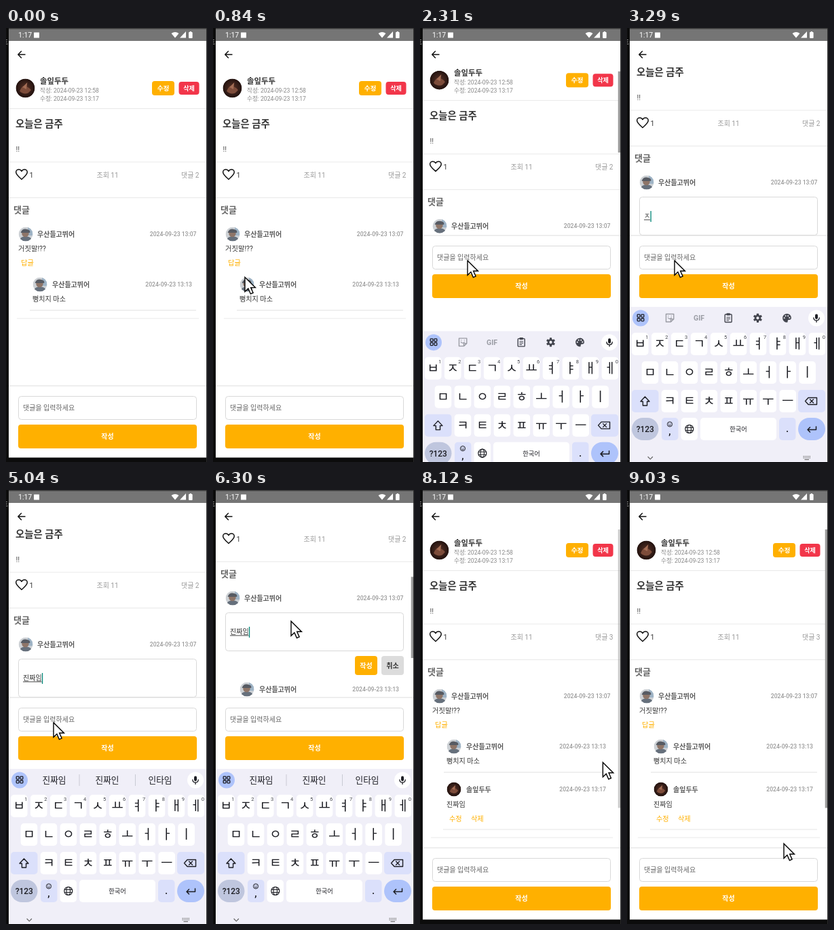
Write an HTML page that moves like this. It is 296x638 px and loops after 9100 ms.

```html
<!DOCTYPE html>
<html lang="ko">
<head>
<meta charset="utf-8">
<style>
html, body { margin: 0; width: 100%; height: 100%; overflow: hidden; background: #0c0c0c; }
svg { display: block; width: 296px; height: 638px; }
text { font-family: Roboto, 'Noto Sans CJK KR', 'Noto Sans CJK', sans-serif; white-space: pre; }
</style>
</head>
<body>
<svg id="stage" viewBox="0 0 296 638" xmlns="http://www.w3.org/2000/svg"></svg>
<script>
const LOOP = 9100, STEP = 70;
const VIEW_TOP = 58, FOOT_TOP = 526, FOOT_LIFT = 221, KB_TOP = 410;
const AMBER = '#ffb000', INK = '#333', GREY = '#999', CHAR = 9.2;
const AUTHOR = '솔잎두두', GUEST = '우산들고뛰어';

// markup helpers
const text = (x, y, s, size, fill, o = {}) =>
  `<text x="${x}" y="${y}" font-size="${size}" fill="${fill}" font-weight="${o.w || 400}" text-anchor="${o.a || 'start'}"${o.id ? ` id="${o.id}"` : ''}>${s}</text>`;
const rect = (x, y, w, h, fill, r = 0, extra = '') =>
  `<rect x="${x}" y="${y}" width="${w}" height="${h}" rx="${r}" fill="${fill}" ${extra}/>`;
const rule = (x1, x2, y, c = '#e9e9e9') => rect(x1, y - .5, x2 - x1, 1, c);
const path = (d, stroke = '#222', w = 1.4, fill = 'none') =>
  `<path d="${d}" stroke="${stroke}" stroke-width="${w}" fill="${fill}" stroke-linecap="round" stroke-linejoin="round"/>`;
const circle = (x, y, r, fill, extra = '') => `<circle cx="${x}" cy="${y}" r="${r}" fill="${fill}" ${extra}/>`;
const group = (id, inner, extra = '') => `<g id="${id}" ${extra}>${inner}</g>`;
const at = (x, y, inner, s = 1) => `<g transform="translate(${x} ${y}) scale(${s})">${inner}</g>`;
const button = (x, y, w, h, label, bg, fg, size = 10) =>
  rect(x, y, w, h, bg, 4) + text(x + w / 2, y + h / 2 + size * .37, label, size, fg, { w: 700, a: 'middle' });
const field = (y, h) => rect(18.5, y + .5, 262, h - 1, '#fff', 4, 'stroke="#d9d9d9"');

const darkPhoto = (x, y, r) => at(x, y, `<g clip-path="url(#disc)">${circle(0, 0, 10, 'url(#brown)')
  }<path d="M-6 3Q-3-4 1-2T6 2L3 5Q-2 7-6 3" fill="#7d4c3a"/><path d="M-3-1L2-6 1 1Z" fill="#a36d55"/></g>`, r / 10);
const lightPhoto = (x, y) => at(x, y, `<g clip-path="url(#disc)">${circle(0, 0, 10, '#cdd1d5')
  }${rect(3, -10, 7, 12, '#9fb4c6')}<path d="M-9 10Q-8 3 0 3T9 10Z" fill="#66707c"/>${
  circle(-.5, -1, 5, '#8e7568')}<path d="M-7-2Q-5-8 1-7T6-2Z" fill="#575b63"/></g>`, 1.05);

const comment = (x, y, photo, name, time, end) =>
  photo + text(x, y + 4, name, 10, '#5c5c5c', { w: 700 }) +
  text(end, y + 3, '2024-09-23 ' + time, 8.6, GREY, { w: 500, a: 'end' });

const post =
  darkPhoto(28.5, 88.5, 14) + text(50, 82, AUTHOR, 11.4, INK, { w: 700 }) +
  text(50, 94.8, '작성: 2024-09-23 12:58', 8.6, '#888') +
  text(50, 106.5, '수정: 2024-09-23 13:17', 8.6, '#888') +
  button(215, 78, 33, 21, '수정', AMBER, '#fff', 9.6) + button(254.5, 79, 30, 19, '삭제', '#f2364a', '#fff', 9) +
  rule(4, 295, 118.5) + text(14, 146, '오늘은 금주', 14.4, INK, { w: 700 }) +
  text(14.5, 182, '!!', 11, '#555') + rule(4, 295, 197) +
  path('M23 222.5C18 218 14.7 215.4 14.7 212 14.7 209.6 16.6 208 18.8 208 20.6 208 22.2 209 23 210.6 23.8 209 25.4 208 27.2 208 29.4 208 31.3 209.6 31.3 212 31.3 215.4 28 218 23 222.5Z', '#111', 1.5) +
  text(34.5, 220, '1', 10.5, INK) + text(149.5, 220, '조회 11', 10, GREY, { a: 'middle' }) +
  text(284.5, 220, '댓글 2', 10, GREY, { a: 'end', id: 'count' }) +
  rule(4, 295, 249.5) + text(11, 272, '댓글', 13, '#666', { w: 700 }) +
  comment(46, 303, lightPhoto(29, 303), GUEST, '13:07', 280.5);

const plain = text(18, 328, '거짓말!??', 10.3, INK) + text(22, 349, '답글', 10.3, AMBER, { id: 'reply' });

const form = field(324, 57) +
  text(25, 356, '대댓글을 입력하세요', 10, '#777', { id: 'hint' }) + text(25, 356, '', 10, INK, { id: 'typed' }) +
  rect(25, 357.5, 0, .9, INK, 0, 'id="under"') + rect(25, 345, 1.3, 16, '#008577', 0, 'id="caret"') +
  button(209, 388, 33, 28, '작성', AMBER, '#fff') + button(248, 388, 33, 28, '취소', '#dcdcdc', INK);

const nested = comment(68, 377, lightPhoto(50, 377), GUEST, '13:13', 274) +
  text(39, 402, '뻥치지 마소', 10.1, INK) + rule(35, 280, 415, '#e2e2e2');

const added = comment(68, 440, darkPhoto(50, 440, 10.5), AUTHOR, '13:17', 274) +
  text(39, 466, '진짜임', 10.1, INK) + text(43, 487, '수정', 10.2, AMBER) + text(75, 487, '삭제', 10.2, AMBER) +
  rule(34, 280, 499, '#e6e6e6');

const header = rect(4, 0, 291, VIEW_TOP, '#fff') + rect(4, 1, 291, 18, '#757575') + rect(4, 0, 291, 1.5, '#3c3c3c') +
  text(18, 14, '1:17', 10.5, '#fff') + rect(41, 6.5, 8, 8, '#fff', .5) +
  path('M243.5 8Q249 4 254.5 8L249 14.5Z', 'none', 0, '#fff') + path('M265 5V14.5H256Z', 'none', 0, '#fff') +
  rect(269, 6, 5.6, 9, '#fff', 1) + rect(270.7, 5, 2.2, 2, '#fff') +
  path('M28 39H18M22.5 34.3L17.8 39 22.5 43.7', '#111', 1.5);

const footer = rect(4, FOOT_TOP, 291, 340, '#fff') + rule(4, 295, FOOT_TOP, '#dedede') + field(541, 35) +
  text(25, 562, '댓글을 입력하세요', 10, '#666') + button(18, 583, 263, 35, '작성', AMBER, '#fff');

// keyboard
const SOFT = '#dbe0fb', DARK = '#1d1e24', ICON = '#43454e';
const key = (x, y, w, fill = '#fff', r = 5) => rect(x, y, w, 33, fill, r);
const row = (letters, x0, y, digits) => [...letters].map((c, i) => {
  const x = x0 + i * 28.95;
  return key(x - 12.3, y, 24.6) + text(x, y + 23, c, 19, DARK, { w: 500, a: 'middle' }) +
    (digits ? text(x + 10, y + 9, (i + 1) % 10, 7.5, ICON, { a: 'middle' }) : '');
}).join('');

const grid = [0, 1, 2, 3].map(i =>
  rect(15.2 + (i % 2) * 5.8, 421.2 + (i >> 1) * 5.8, 3.9, 3.9, 'none', .8, `stroke="${DARK}" stroke-width="1.3"`)).join('');
const teeth = [0, 1, 2, 3, 4, 5].map(i =>
  `<rect x="-1.6" y="-6.6" width="3.2" height="4" rx=".6" fill="${ICON}" transform="rotate(${i * 60})"/>`).join('');
const tools =
  path('M57.5 420.5H68.8V428L64.5 432H57.5ZM64.5 432V428H68.8', '#9a9ca4', 1.4) +
  path('M60.5 426Q62.5 429 65.5 426M60.8 423.3V423.4M65.3 423.3V423.4', '#9a9ca4', 1.3) +
  text(106, 430, 'GIF', 10.5, '#9a9ca4', { w: 700, a: 'middle' }) +
  rect(144.2, 421, 10, 11.5, 'none', 1, `stroke="${ICON}" stroke-width="1.4"`) + rect(146.5, 419.3, 5.4, 3.2, ICON, .8) +
  path('M146.8 425.3H151.6M146.8 427.6H151.6M146.8 429.9H149.8', ICON, 1) +
  at(192.5, 426.3, teeth + circle(0, 0, 3.4, 'none', `stroke="${ICON}" stroke-width="2.6"`)) +
  path('M235.5 420A6.4 6.4 0 1 0 235.5 432.8C237.5 432.8 236 430.5 237.3 429.3 238.5 428.5 241.9 430 241.9 425.8A6.2 6.2 0 0 0 235.5 420Z', 'none', 0, ICON) +
  [[231.7, 426.2], [233.6, 423.2], [237.2, 423.2], [239.3, 426]].map(p => circle(...p, 1.05, '#f0eff8')).join('');
const words = [71, 149, 227].map((x, i) => text(x, 431, '', 12.7, DARK, { a: 'middle', id: 'word' + i })).join('') +
  rect(107.5, 418, 1, 17, '#c9cad3') + rect(190, 418, 1, 17, '#c9cad3');

const keyboard = rect(4, KB_TOP, 291, 240, '#f0eff8') + circle(20, 426.5, 12, '#aec3fb') + grid +
  group('tools', tools) + group('words', words) +
  circle(279, 426.5, 12, '#fff') + rect(277, 420.5, 4, 7.6, DARK, 2) +
  path('M274.8 426Q275 430 279 430T283.2 426M279 430V432.4', DARK, 1.3) +
  row('ㅂㅈㄷㄱㅅㅛㅕㅑㅐㅔ', 19.3, 448, true) + row('ㅁㄴㅇㄹㅎㅗㅓㅏㅣ', 34, 490) + row('ㅋㅌㅊㅍㅠㅜㅡ', 63, 532) +
  key(7, 532, 39.5, SOFT) + path('M26.5 542L33 549H29.6V555H23.4V549H20Z', DARK, 1.4) +
  key(252, 532, 40, SOFT) + path('M267 543.5H279.5V553.5H267L262.5 548.5ZM269.5 546L274.5 551M274.5 546L269.5 551', DARK, 1.4) +
  key(7, 573, 39.5, '#bfc6de', 16.5) + text(26.8, 594, '?123', 12, DARK, { w: 500, a: 'middle' }) +
  key(51, 573, 24.5, SOFT) + circle(63, 582.5, 3.6, 'none', `stroke="${DARK}" stroke-width="1"`) +
  path('M61.3 583.5Q63 585.5 64.7 583.5M61.7 581.5V581.6M64.3 581.5V581.6', DARK, .9) +
  text(63, 598, ',', 15, DARK, { w: 500, a: 'middle' }) +
  key(79.5, 573, 24.5) + circle(91.8, 589.5, 6, 'none', `stroke="${DARK}" stroke-width="1.2"`) +
  `<ellipse cx="91.8" cy="589.5" rx="2.7" ry="6" fill="none" stroke="${DARK}" stroke-width="1.1"/>` +
  path('M86.4 587.5H97.2M86.4 591.5H97.2', DARK, 1) +
  key(108, 573, 112) + text(164, 593, '한국어', 9.2, DARK, { a: 'middle' }) +
  key(224, 573, 24.5, SOFT) + text(236.2, 594, '.', 15, DARK, { w: 500, a: 'middle' }) +
  key(252, 573, 40, '#aec3fb', 16.5) + path('M278.5 586V590.5H266M269.5 587L266 590.5 269.5 594', DARK, 1.5) +
  path('M31 630.5L34.3 633.8 37.6 630.5', '#666', 1.2) +
  [0, 1].map(r => [0, 1, 2, 3, 4].map(i => rect(259.5 + i * 2.3, 629 + r * 2.3, 1.3, 1.3, '#777')).join('')).join('') +
  rect(261.5, 633.8, 6.5, 1.3, '#777');

document.getElementById('stage').innerHTML =
  `<defs><clipPath id="disc"><circle r="10"/></clipPath>
  <radialGradient id="brown"><stop offset="0" stop-color="#5a3327"/><stop offset="1" stop-color="#22120f"/></radialGradient></defs>` +
  rect(0, 0, 296, 638, '#0c0c0c') + text(-5, 24, '드', 9, '#ddd') + rect(4, 0, 291, 631.5, '#fff') +
  group('scroll', post + group('plain', plain) + group('form', form) + group('nested', nested) +
    group('added', added) + group('end', rule(16, 284, 0))) +
  rect(291.7, 0, 3.3, 0, '#9a9a9a', 0, 'id="bar"') +
  header + group('footer', footer) + rect(4, 631.5, 291, 7, '#0c0c0c') + group('kb', keyboard) +
  rect(0, 0, 4, 638, '#0c0c0c') + text(-5, 24, '드', 9, '#ddd') + rect(295, 0, 1, 638, '#2a2a2a') +
  group('cursor', '<path d="M0 0V21.3L4.9 16.7 8.4 24.6 12.1 23 8.7 15.3H15.4Z" fill="#fff" stroke="#000" stroke-width="1.4"/>');

// timelines
const SCROLL = [[2240, 0], [2520, 76], [5810, 76], [6230, 144], [6650, 144], [6790, 43], [7700, 43], [7770, 0]];
const KB = [[2100, 1], [2380, 0], [6580, 0], [6860, 1]];
const BAR = [[2170, 0], [2240, 1], [2870, 1], [3150, 0], [5810, 0], [5880, 1], [7980, 1], [8260, 0], [8890, 0], [8960, 1]];
const MOUSE = [[0, 190, 645], [350, 130, 500], [980, 35, 347], [1750, 35, 347], [2100, 70, 342], [5600, 70, 342],
  [5880, 110, 262], [6230, 115, 193], [6300, 115, 193], [6510, 222, 257], [7140, 222, 257], [7350, 222, 291],
  [7560, 222, 352], [7840, 222, 352], [8330, 300, 432], [8540, 300, 432], [8820, 258, 499], [8890, 258, 499], [9030, 231, 520]];
const TYPING = [
  [0, ''], [3220, 'ㅈ'], [3430, '지', '지금', '지', '지난'], [3570, '진', '진짜', '진', '진행'],
  [4340, '진ㅉ', '진짜', '진자', '진쪽'], [4480, '진짜', '진짜', '진자', '진짜로'],
  [4760, '진짜ㅇ', '진짜', '진짜야', '진짜요'], [4900, '진짜이', '진짜이', '진짜인', '진짜임'],
  [5040, '진짜임', '진짜임', '진짜인', '인타임']];
const BLINK_OFF = [[2730, 3220], [4130, 4340], [5600, 6090]];

const within = (t, a, b) => t >= a && t < b;
function sample(keys, t, col = 1) {
  const i = keys.findIndex(k => k[0] > t);
  if (i < 0) return keys[keys.length - 1][col];
  if (i === 0) return keys[0][col];
  const a = keys[i - 1], b = keys[i], u = (t - a[0]) / (b[0] - a[0]);
  return a[col] + (b[col] - a[col]) * u * u * (3 - 2 * u);
}

const el = {};
document.querySelectorAll('[id]').forEach(n => el[n.id] = n);
const show = (n, on) => n.setAttribute('display', on ? 'inline' : 'none');
const move = (n, x, y) => n.setAttribute('transform', `translate(${x} ${y})`);
const put = (n, s) => { if (n.textContent !== s) n.textContent = s; };

function draw(t) {
  const open = within(t, 1470, 7770), sent = t >= 7910;
  const lifted = within(t, 2240, 6720), focused = within(t, 2170, 6650);
  const scroll = sample(SCROLL, t);
  const shift = open ? 60 : 0;
  const height = open ? 511 : sent ? 535 : 451;

  move(el.scroll, 0, -scroll);
  show(el.plain, !open);
  show(el.form, open);
  show(el.added, sent);
  move(el.nested, 0, shift);
  move(el.end, 0, 427 + (sent ? 84 : shift));
  el.reply.setAttribute('opacity', within(t, 1330, 1470) ? .3 : 1);
  put(el.count, sent ? '댓글 3' : '댓글 2');

  const [, typed, ...words] = TYPING.filter(k => k[0] <= t).pop();
  put(el.typed, typed);
  show(el.hint, !typed);
  show(el.under, focused);
  el.under.setAttribute('width', typed.length * CHAR);
  show(el.caret, focused && !BLINK_OFF.some(b => within(t, ...b)));
  el.caret.setAttribute('x', 25.3 + typed.length * CHAR);
  show(el.tools, !words.length);
  show(el.words, words.length);
  words.forEach((w, i) => put(el['word' + i], w));

  move(el.footer, 0, lifted ? -FOOT_LIFT : 0);
  const kb = sample(KB, t);
  show(el.kb, kb < 1);
  move(el.kb, 0, kb * 228);

  const view = FOOT_TOP - VIEW_TOP - (lifted ? FOOT_LIFT : 0), ratio = view / height;
  el.bar.setAttribute('y', VIEW_TOP + scroll * ratio);
  el.bar.setAttribute('height', view * ratio);
  el.bar.setAttribute('opacity', ratio < 1 ? sample(BAR, t) : 0);

  move(el.cursor, sample(MOUSE, t), sample(MOUSE, t, 2));
}

function tick() {
  const t = performance.now() % LOOP;
  draw(Math.floor(t / STEP) * STEP);
  requestAnimationFrame(tick);
}
tick();
</script>
</body>
</html>
```
